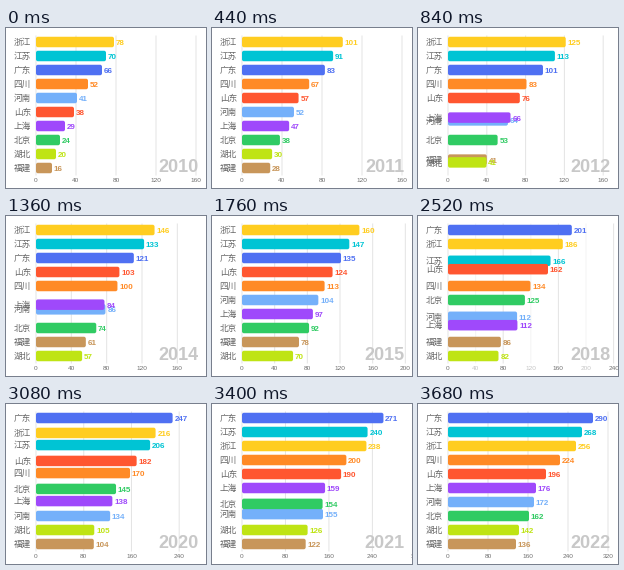
These frames come from a looping animation (200 px wide and 160 px high, 4 s). A matplotlib script:

```python
import numpy as np
import matplotlib.pyplot as plt
from matplotlib.animation import FuncAnimation
from matplotlib.patches import FancyBboxPatch

W, H, DPI = 200, 160, 100
FRAMES, INTERVAL = 100, 40
HOLD_MS, YEAR_MS = 60, 300
START_YEAR, LAST, KEY_STEP = 2010, 12, 3
LEFT, SPAN = 30, 160                      # zero line and plot width
TOP, ROW, BAR = 14, 14, 10.5              # first row centre, row pitch, bar height
MAX0, MAX1, ZOOM_FROM = 160, 320, 2

# name: colour, value every third year; later entries are drawn on top
PROVINCES = {
    "广东": ("#4f70f2", 66, 106, 139, 223, 290),
    "江苏": ("#00c4d4", 70, 120, 150, 172, 268),
    "山东": ("#ff5630", 38, 82, 129, 174, 196),
    "浙江": ("#ffcd20", 78, 132, 164, 194, 256),
    "四川": ("#ff8a26", 52, 88, 116, 140, 224),
    "河南": ("#74b0fa", 41, 67, 109, 113, 172),
    "福建": ("#c8965a", 16, 45, 82, 87, 136),
    "湖北": ("#bfe414", 20, 44, 73, 85, 142),
    "上海": ("#9f49fb", 29, 72, 100, 117, 176),
    "北京": ("#30cb63", 24, 57, 96, 135, 162),
}
years = np.arange(LAST + 1)
values = np.array([np.interp(years, years[::KEY_STEP], keys)
                   for _, *keys in PROVINCES.values()])
ranks = (-values).argsort(axis=0).argsort(axis=0)

fig = plt.figure(figsize=(W / DPI, H / DPI), dpi=DPI, facecolor="white")
ax = fig.add_axes([0, 0, 1, 1])
ax.set_xlim(0, W)
ax.set_ylim(H, 0)
ax.axis("off")


def label(x, y, s, px, color, font="Liberation Sans", **kw):
    return ax.text(x, y, s, fontsize=px * 72 / DPI, color=color, family=font,
                   va="baseline", **kw)


ticks = []
for v in range(0, MAX1 + 1, 40):
    line, = ax.plot([LEFT, LEFT], [8, 147], color="#e4e4e4", lw=0.72,
                    snap=False, zorder=1)
    text = label(LEFT, 154.2, str(v), 6.5, "#707070", ha="center", zorder=1)
    ticks.append((v, line, text))

year_text = label(192.6, 144.3, "", 18, "#c8c8c8", weight="bold", ha="right", zorder=2)

bars = []
for i, (name, (color, *_)) in enumerate(PROVINCES.items()):
    z = 3 + i * 0.1
    box = FancyBboxPatch((LEFT, 0), 10, BAR, fc=color, ec="none", zorder=z,
                         boxstyle="round,pad=0,rounding_size=2")
    ax.add_patch(box)
    tag = label(25, 0, name, 8.6, "#666666", "Noto Sans CJK JP", ha="right", zorder=z)
    num = label(0, 0, "", 8, color, weight="bold", ha="left", zorder=z)
    bars.append((box, tag, num))


def draw(frame):
    t = np.clip((frame * INTERVAL - HOLD_MS) / YEAR_MS, 0, LAST)
    zoom = max(0, (t - ZOOM_FROM) / (LAST - ZOOM_FROM))

    # ticks slide linearly in pixels, bars follow the linearly growing maximum
    tick_scale = SPAN * ((1 - zoom) / MAX0 + zoom / MAX1)
    bar_scale = SPAN / (MAX0 + (MAX1 - MAX0) * zoom)
    fade = np.clip((0.7 - zoom) / 0.2, 0, 1)

    for v, line, text in ticks:
        x = LEFT + v * tick_scale
        line.set_xdata([x, x])
        text.set_x(x)
        for part in (line, text):
            part.set_alpha(fade if v % 80 else 1)
            part.set_visible(x < W + 8)

    for (box, tag, num), vals, rank in zip(bars, values, ranks):
        v = np.interp(t, years, vals)
        y = TOP + ROW * np.interp(t, years, rank)
        width = v * bar_scale
        box.set_bounds(LEFT, y - BAR / 2, width, BAR)
        tag.set_y(y + 3.1)
        num.set_position((LEFT + width + 1.8, y + 3))
        num.set_text(f"{v:.0f}")

    year_text.set_text(str(START_YEAR + int(t)))
    return []


anim = FuncAnimation(fig, draw, frames=FRAMES, interval=INTERVAL,
                     init_func=lambda: draw(0), repeat=True, repeat_delay=0)
plt.show()
```
